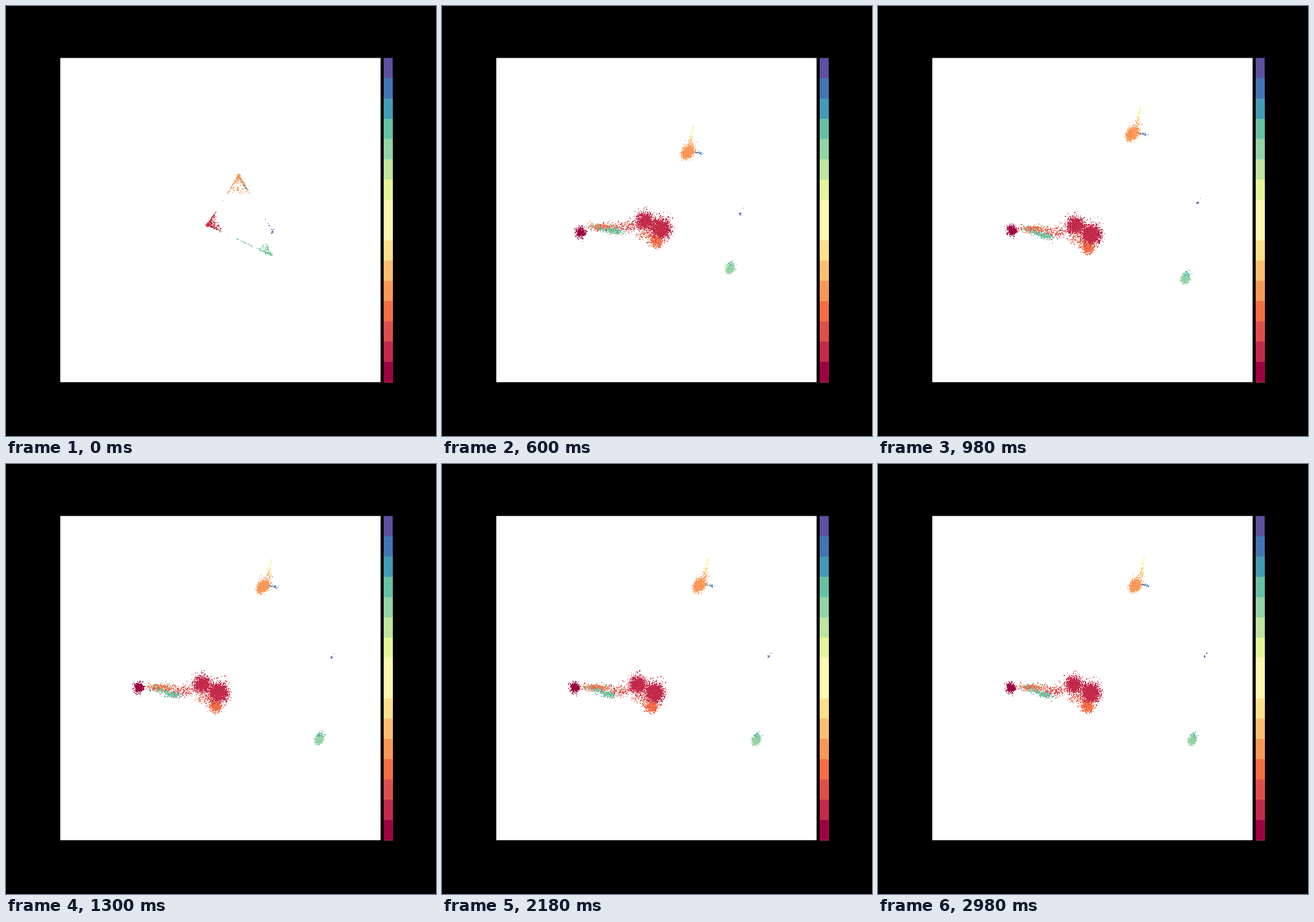
These frames come from a looping animation (748x748 px, 3030 ms). A matplotlib script:

```python
import numpy as np
import matplotlib.pyplot as plt
from matplotlib.animation import FuncAnimation
from matplotlib.patches import Rectangle

SIZE, DPI = 748, 100
LOOP, TICK, STEP = 3030, 10, 20
LAST = 149

rng = np.random.default_rng(11)

# Sixteen classes; the two middle ones share a cream tone
palette = plt.get_cmap("Spectral")(np.arange(16) / 15)
palette[7:9] = (0.984, 0.972, 0.69, 1)

# Corners of the opening layout
RED, TOP, LOW, EAST = np.array([(350, 381), (405, 294), (461, 433), (464, 392)], float)

# (time scale in ms, sharpness) of the drift
FAR, NEAR, LATE = (715, 2.25), (600, 2), (780, 4)

groups = []


def wedge(n, corner, a, b, reach, power):
    """Points crowded in a corner, thinning out towards a and b."""
    da, db = ((v - corner) / np.hypot(*(v - corner)) for v in (a, b))
    w = rng.beta(0.3, 0.3, (n, 1))
    dist = reach * rng.random((n, 1)) ** power
    return corner + dist * (da * w + db * (1 - w)) + rng.normal(0, 0.6, (n, 2))


def red(n):
    return wedge(n, RED, TOP, LOW, 28, 30)


def top(n):
    return wedge(n, TOP, RED, EAST, 38, 10)


def low(n):
    return wedge(n, LOW, RED, TOP, 24, 6)


def add(seed, first, last, pace, offset, cls):
    n = len(seed)
    ends = np.broadcast_to(np.array([first, last], float), (n, 2, 2))
    groups.append((seed, ends, np.tile(pace, (n, 1)), offset, cls))


def blob(seed, first, last, pace, std, main, others, mix=0.06, slope=0):
    """Gaussian cloud of one class with a share of others mixed in."""
    n = len(seed)
    off = rng.normal(0, 1, (n, 2)) * std
    off[:, 1] += slope * off[:, 0]
    cls = np.where(rng.random(n) < mix, rng.choice(others, n), main)
    add(seed, first, last, pace, off, cls)


# Long left-hand island
blob(red(520), (258, 402), (231, 389.5), NEAR, 3.7, 0, [1], 0.03)
blob(red(360), (298, 377), (268, 388.5), NEAR, (12, 2.6), 3, [2, 4, 12], 0.45)
blob(red(200), (326, 379), (308, 395), LATE, (13, 4.6), 2, [1, 3], 0.5)
blob(wedge(260, LOW, RED, RED, 70, 12), (303, 387), (289, 401), LATE,
     (7, 2.6), 12, [11, 4], 0.12, 0.15)
blob(red(90), (283, 387), (270, 394), LATE, (10, 2.6), 12, [3], 0.2, 0.25)
blob(red(1300), (374, 359), (341, 384), NEAR, (7, 6.6), 1, [0, 2])
blob(red(2200), (386, 383), (370, 398), LATE, (7.2, 7.6), 1, [0, 2])
blob(red(520), (377, 404), (365, 422), LATE, (4.6, 4.6), 3, [2, 4], 0.15)
blob(red(140), (362, 395), (349, 409), LATE, (10, 6), 3, [2], 0.45, 0.3)
core = sum(len(g[0]) for g in groups)

# Upper island: orange body, pale spike, blue tail
blob(top(1250), (408.6, 295), (448, 211), FAR, (4.5, 4.8), 4, [3, 5], 0.05, -0.4)
n = 100
s = rng.random((n, 1)) ** 1.2
wide = rng.normal(0, 1, (n, 2)) * (0.4 + 2 * (1 - s))
add(top(n), (413.4, 253), (463, 164), FAR, (1 - s) * (-7, 33) + wide,
    np.round(4 + 4.6 * s[:, 0]).astype(int))
blob(wedge(26, TOP + (3, 8), EAST, EAST, 20, 1), (429, 298), (466, 211), FAR,
     (3.2, 0.8), 14, [13, 4], 0.2, 0.2)

# Green and violet islands
blob(low(430), (457, 435), (546.5, 481.5), FAR, (3.2, 3.4), 11, [10, 12], 0.08, -0.2)
blob(low(110), (459, 430), (549, 475), FAR, (3, 3.2), 12, [11, 13], 0.45, -0.2)
blob(EAST + rng.normal(0, 1, (10, 2)) * (1, 2.6), (473, 387), (569, 335), FAR,
     (1, 1.2), 15, [14], 0)
blob(EAST + rng.normal(0, 1, (1, 2)), (480, 372), (572, 329), FAR, 0, 15, [14], 0)

# Loose points on the opening layout's edges
for a, b, cls in ((TOP, RED, 4), (LOW, RED, 12), (EAST, TOP, 14)):
    blob(a + (b - a) * rng.random((5, 1)), (298, 382), (275, 390), NEAR,
         (10, 3), cls, [cls])

starts, ends, pace, offsets, classes = map(np.concatenate, zip(*groups))
total = len(starts)

# Early outliers thrown off the main island
throw = np.zeros((total, 2))
flung = rng.choice(core, 34, replace=False)
throw[flung] = np.clip(rng.standard_t(1.6, (34, 2)) * (14, 24), (-120, -235), (110, 235))

# Mixed drawing order
order = rng.permutation(total)
starts, ends, pace, offsets, classes, throw = (
    v[order] for v in (starts, ends, pace, offsets, classes, throw))
first, last = ends[:, 0], ends[:, 1]


def positions(step):
    t = step * STEP
    opened = 1 - np.exp(-t / 80)
    calm = 1 - step / LAST
    drift = 1 - np.exp(-(t / pace[:, :1]) ** pace[:, 1:])
    pos = first + (last - first) * drift + offsets * (1 + 0.06 * calm)
    pos += throw * np.exp(-(t / 470) ** 4)
    shake = np.random.default_rng(step).normal(0, 1, (total, 2))
    return starts + (pos - starts + shake * (0.15 + 0.4 * calm)) * opened


fig = plt.figure(figsize=(SIZE / DPI, SIZE / DPI), dpi=DPI, facecolor="black")
ax = fig.add_axes([0, 0, 1, 1])
ax.set_xlim(0, SIZE)
ax.set_ylim(SIZE, 0)
ax.axis("off")


def box(x0, y0, x1, y1, color):
    ax.add_patch(Rectangle((x0, y0), x1 - x0, y1 - y0, fc=color, lw=0, snap=False))


Y0, Y1 = 90.4, 654.4
box(94.4, Y0, 651.6, Y1, "white")
for k, color in enumerate(palette[::-1]):
    box(657, Y0 + k * (Y1 - Y0) / 16, 672.7, Y1, color)

dots = ax.scatter(*positions(0).T, s=(1.35 * 72 / DPI) ** 2, marker="s",
                  c=palette[classes], linewidths=0, zorder=3)


def draw(i):
    dots.set_offsets(positions(min(i * TICK // STEP, LAST)))
    return (dots,)


anim = FuncAnimation(fig, draw, frames=LOOP // TICK, interval=TICK,
                     repeat=True, repeat_delay=0, blit=False)
plt.show()
```
